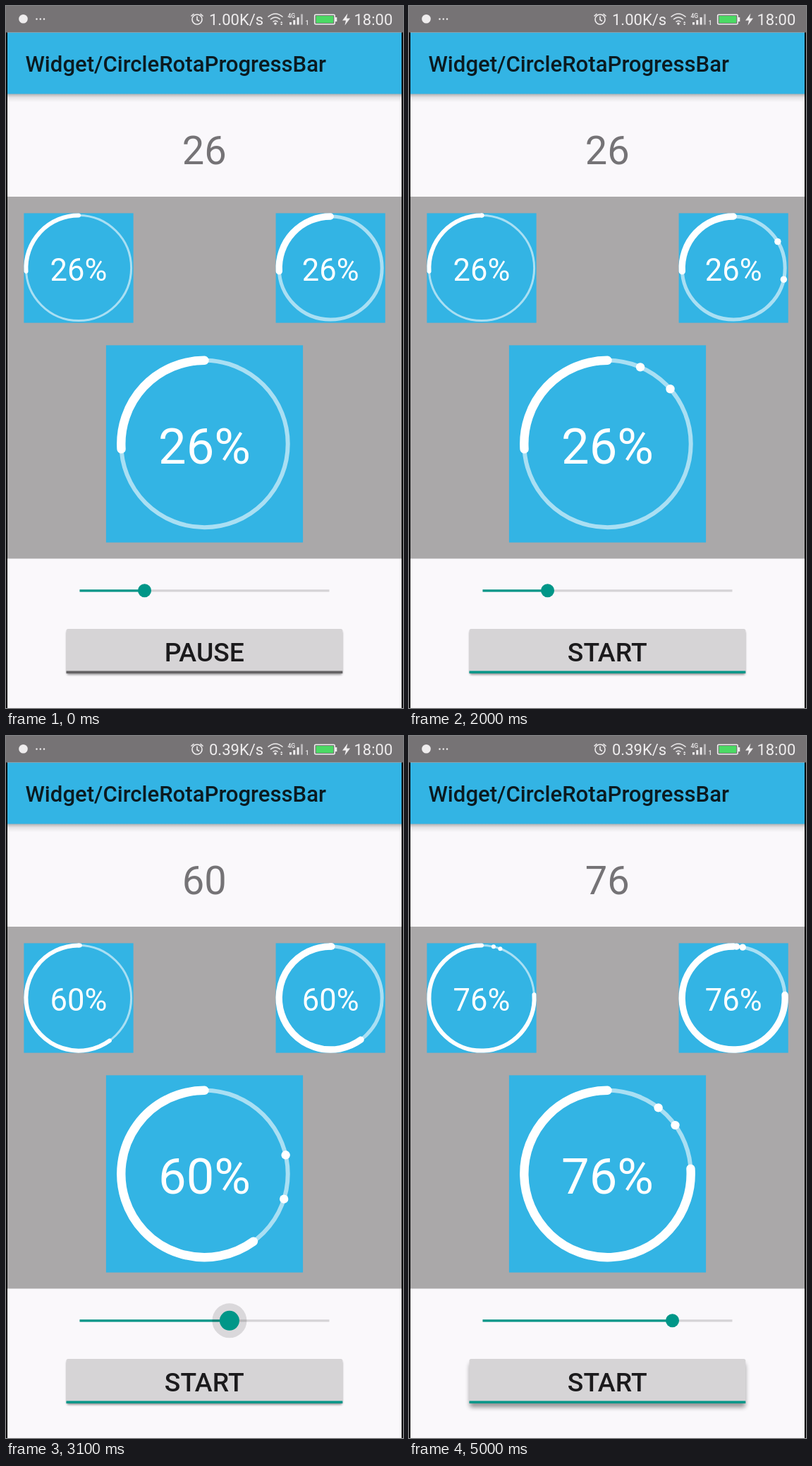
Write an HTML page that moves like this. It is 563 px wide and 994 px high and loops after 5100 ms.

```html
<!DOCTYPE html>
<html lang="en">
<head>
<meta charset="utf-8">
<title>Circle progress</title>
<style>
  html, body { margin: 0; width: 100%; height: 100%; overflow: hidden; background: #000; }
  svg { display: block; width: 563px; height: 994px; font-family: Roboto, "Noto Sans", sans-serif; }
  .mid { text-anchor: middle; }
  .line { fill: none; stroke: #efedee; stroke-width: 1.6; }
</style>
</head>
<body>
<svg viewBox="0 0 563 994">
  <defs>
    <linearGradient id="barShade" x1="0" y1="0" x2="0" y2="1">
      <stop offset="0" stop-color="#000" stop-opacity=".3"/>
      <stop offset=".45" stop-color="#000" stop-opacity=".09"/>
      <stop offset="1" stop-color="#000" stop-opacity="0"/>
    </linearGradient>
    <filter id="soft" x="-5%" y="-30%" width="110%" height="160%">
      <feGaussianBlur id="blur" stdDeviation="1.5"/>
    </filter>
  </defs>

  <rect x="2" width="559" height="994" fill="#faf8fb"/>
  <rect x="2" y="270" width="559" height="512.5" fill="#aaa8a9"/>
  <rect x="2" y="124" width="559" height="12" fill="url(#barShade)"/>
  <rect x="2" y="37.5" width="559" height="87" fill="#33b4e4"/>
  <rect width="563" height="37.5" fill="#767375"/>
  <text x="27.5" y="92.5" font-size="31.1" font-weight="500" fill="#0b1a20">Widget/CircleRotaProgressBar</text>

  <g id="status" fill="#efedee">
    <circle cx="24.5" cy="18.3" r="6.3"/>
    <circle cx="43.5" cy="18.5" r="1.2"/><circle cx="48.8" cy="18.5" r="1.2"/><circle cx="54" cy="18.5" r="1.2"/>
    <circle class="line" cx="271" cy="19" r="7"/>
    <path class="line" d="M271 14.5V19.5L274 21.5M262.5 14.5L266.5 11M279.5 14.5L275.5 11"/>
    <text id="speed" x="288" y="27" font-size="22"></text>
    <path class="line" d="M371.5 15.5Q382 6.5 392.500 15.5M375 19Q382 13 389 19M378.500 22.5Q382 19.500 385.5 22.5"/>
    <circle cx="382" cy="25" r="1.8"/>
    <path d="M389 24l1.700-2.200 1.700 2.200zM389 25l1.700 2.200 1.700-2.200z"/>
    <text x="399.500" y="16.5" font-size="8.5" font-weight="500">4G</text>
    <path d="M402 23h3v3.500h-3zM407.300 20h3v6.500h-3zM412.600 16h3v10.500h-3z"/>
    <path d="M418 11.500h3v15h-3z" opacity=".55"/>
    <text x="424.500" y="26.5" font-size="9" font-weight="500">1</text>
    <rect class="line" x="437.700" y="12.200" width="28.500" height="13.600" rx="1.500"/>
    <rect x="439.700" y="14" width="24.500" height="10" fill="#4bd964"/>
    <rect x="467" y="16" width="2.300" height="6"/>
    <path d="M484.500 10.500L477 20.500H482L480.500 27.500L488 17.500H483Z"/>
    <text x="493.500" y="27" font-size="22">18:00</text>
  </g>

  <text id="count" class="mid" x="281.3" y="224" font-size="56" fill="#757376"></text>
  <g id="rings"></g>

  <g id="slider">
    <rect x="104.500" y="826.300" width="354" height="3.200" fill="#d5d3d6"/>
    <rect id="filled" x="104.500" y="826.300" height="3.200" fill="#009688"/>
    <circle id="halo" cy="827.800" r="24.500" fill="#000" opacity=".13"/>
    <circle id="thumb" cy="827.800" fill="#009688"/>
  </g>

  <rect id="shadow" x="86" width="391" height="62" rx="3" filter="url(#soft)"/>
  <rect x="85.500" y="882" width="391.800" height="63" rx="2.500" fill="#d6d4d6"/>
  <rect id="underline" x="85.500" y="941.500" width="391.800" height="3.500"/>
  <text id="label" class="mid" x="281.300" y="928" font-size="37.300" font-weight="500" fill="#1b1a1c"></text>
</svg>
<script>
const LOOP = 5100, STEP = 100, HOLD = 900;
const $ = id => document.getElementById(id);

function add(parent, tag, attrs) {
  const el = document.createElementNS("http://www.w3.org/2000/svg", tag);
  set(el, attrs);
  return parent.appendChild(el);
}

function set(el, attrs) {
  for (const key in attrs) el.setAttribute(key, attrs[key]);
}

// travel: time a dot needs for the open arc; lag: delay of the second dot
const rings = [
  { x: 103, y: 371, half: 77.6, r: 74.6, track: 3, bar: 6, font: 43.5, base: 389, travel: 1000, lag: 100 },
  { x: 460.2, y: 371, half: 77.6, r: 73, track: 5, bar: 9.4, font: 43.5, base: 389, travel: 2000, lag: 300 },
  { x: 281.5, y: 620, half: 139.6, r: 118.2, track: 6, bar: 12.4, font: 70.5, base: 648, travel: 1500, lag: 200 }
].map(ring => {
  const { x, y, half, r } = ring, g = add($("rings"), "g", {});
  add(g, "rect", { x: x - half, y: y - half, width: 2 * half, height: 2 * half, fill: "#33b4e4" });
  add(g, "circle", { cx: x, cy: y, r, fill: "none", stroke: "#fff", "stroke-opacity": .58, "stroke-width": ring.track });
  ring.arc = add(g, "path", { fill: "none", stroke: "#fff", "stroke-width": ring.bar, "stroke-linecap": "round" });
  ring.dots = [0, 1].map(() => add(g, "circle", { r: ring.bar / 2, fill: "#fff" }));
  ring.text = add(g, "text", { class: "mid", x, y: ring.base, "font-size": ring.font, fill: "#fff" });
  return ring;
});

// degrees clockwise from the top
function onRing({ x, y, r }, degrees) {
  const a = degrees * Math.PI / 180;
  return [x + r * Math.sin(a), y - r * Math.cos(a)];
}

const drag = [[2200, 26], [2400, 30], [2600, 40], [2800, 50], [3100, 60], [3600, 72], [3900, 76]];

function progressAt(t) {
  if (t <= drag[0][0]) return drag[0][1];
  for (let i = 1; i < drag.length; i++) {
    const [t0, p0] = drag[i - 1], [t1, p1] = drag[i];
    if (t <= t1) return Math.round(p0 + (p1 - p0) * (t - t0) / (t1 - t0));
  }
  return drag[drag.length - 1][1];
}

function drawRing(ring, percent, running, clock) {
  const open = 360 - 3.6 * percent;
  const start = onRing(ring, 0), end = onRing(ring, open);
  ring.arc.setAttribute("d", `M${start} A${ring.r} ${ring.r} 0 ${percent > 50 ? 1 : 0} 0 ${end}`);
  ring.text.textContent = percent + "%";
  const phase = clock % (ring.travel + ring.lag);
  ring.dots.forEach((dot, i) => {
    const left = Math.min(1, Math.max(0, 1 - (phase - i * ring.lag) / ring.travel));
    const [cx, cy] = onRing(ring, open * left * left);
    set(dot, { cx, cy, visibility: running ? "visible" : "hidden" });
  });
}

function liftAt(t) {
  if (t === 1000 || t === 5000) return 1;
  return t === 1100 ? .5 : 0;
}

function draw(time) {
  const t = time < HOLD ? 0 : Math.floor(time / STEP) * STEP;
  const running = t >= 1000;
  const percent = progressAt(t);
  const touching = t >= 2300 && t < 4300;
  const lift = liftAt(t);
  const knob = 104.5 + 3.54 * percent;

  $("speed").textContent = t < 2400 ? "1.00K/s" : "0.39K/s";
  $("count").textContent = percent;
  rings.forEach(ring => drawRing(ring, percent, running, Math.max(0, (t - 888) * .951)));

  $("filled").setAttribute("width", knob - 104.5);
  set($("halo"), { cx: knob, visibility: touching ? "visible" : "hidden" });
  set($("thumb"), { cx: knob, r: touching ? 14 : 9.5 });

  set($("shadow"), { y: 885 + 3.5 * lift, opacity: .4 });
  $("blur").setAttribute("stdDeviation", 1.5 + 1.5 * lift);
  $("underline").setAttribute("fill", running ? "#009688" : "#646264");
  $("label").textContent = running ? "START" : "PAUSE";
}

const begun = performance.now();
function tick() {
  draw((performance.now() - begun) % LOOP);
  requestAnimationFrame(tick);
}
tick();
</script>
</body>
</html>
```
